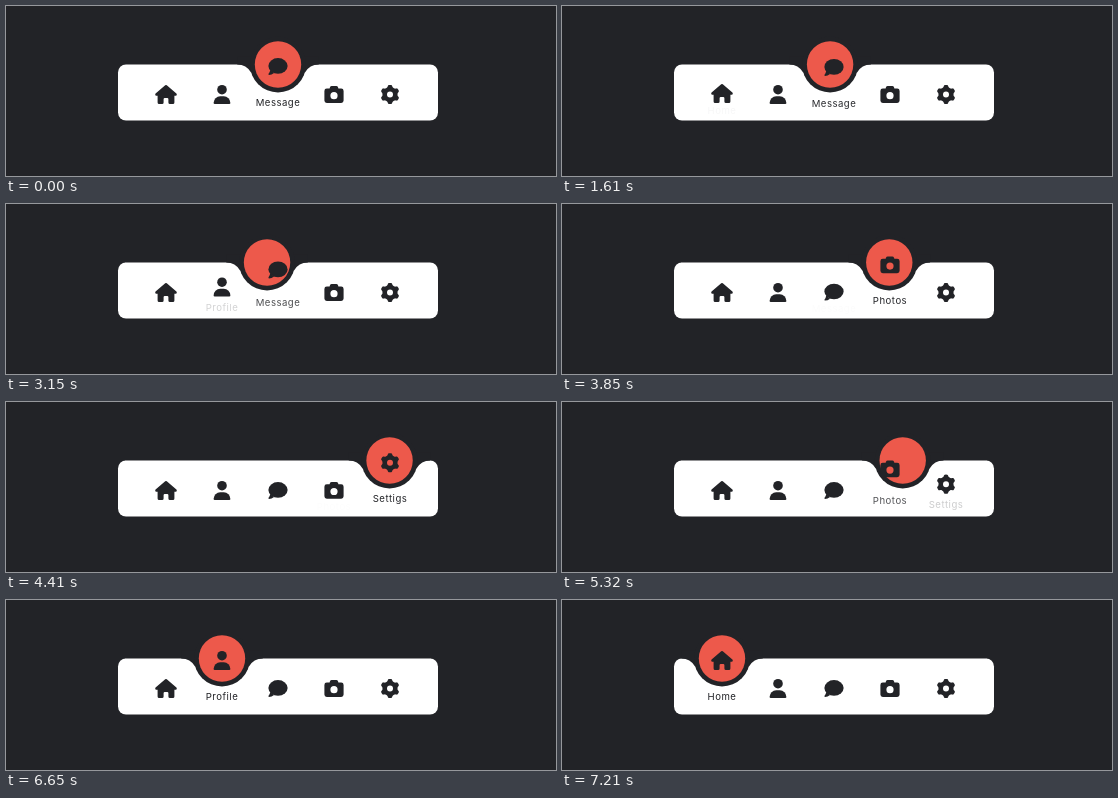
An HTML page that plays this animation: 550x170 px, repeating every 7.35 s.

```html
<!DOCTYPE html>
<html lang="en">
<head>
<meta charset="utf-8">
<title>Navigation bar</title>
<style>
  html, body { margin: 0; width: 100%; height: 100%; overflow: hidden; background: #222327; }
  svg { display: block; width: 550px; height: 170px; fill: #222327; }
  text { font: 12px Inter, sans-serif; letter-spacing: .6px; text-anchor: middle; }
</style>
</head>
<body>
<svg viewBox="0 0 550 170">
  <g transform="translate(112 58.5) scale(.8)">
    <rect width="400" height="70" rx="10" fill="#fff"/>
    <g id="indicator">
      <path id="fillet" d="M-51 0A20 20 0 0 1-33.7 10H-30V-10H-51z"/>
      <use href="#fillet" transform="scale(-1 1)"/>
      <circle r="35"/>
      <circle r="29" fill="#ed594b"/>
    </g>
    <g id="items"></g>
  </g>
</svg>
<script>
const LOOP = 7350, DURATION = 500;
const SPACING = 70, FIRST_X = 60;
const START_ITEM = 2;

// [start time in ms, item that becomes active]
const CLICKS = [
  [1585, 0], [2215, 1], [2900, 2], [3425, 3], [3970, 4],
  [5085, 3], [5575, 2], [6070, 1], [6660, 0]
];

const tooth = 'M-84-160L-54-233q6-17 22-20 32-5 64 0 16 3 22 20L84-160z';
const gear = '<circle r="141" fill="none" stroke="#222327" stroke-width="122"/>' +
  [0, 1, 2, 3, 4, 5].map(i => `<path d="${tooth}" transform="rotate(${i * 60})"/>`).join('');

// Icons are drawn around their centre on a 512-unit em.
const ITEMS = [
  ['Home', `<path d="M0-256q11 0 21 8L277-24q11 11 11 24 0 32-32 32h-32V216q0 40-40 40H104q-40 0-40-40V128
    q0-32-32-32h-64q-32 0-32 32v88q0 40-40 40h-80q-40 0-40-40V32h-32q-32 0-32-32 0-14 10-24L-21-248q10-8 21-8z"/>`],
  ['Profile', `<circle cy="-128" r="128"/>
    <path d="M-46 48h92a178 178 0 0 1 178 178q0 30-30 30h-388q-30 0-30-30A178 178 0 0 1-46 48z"/>`],
  ['Message', `<ellipse cy="-16" rx="256" ry="208"/>
    <path d="M-208 90q-5 54-44 106-12 28 12 28 70 0 136-50z"/>`],
  ['Photos', `<path fill-rule="evenodd" d="M-107-191l-10 31h-75q-64 0-64 64V160q0 64 64 64H192q64 0 64-64V-96
    q0-64-64-64h-75l-10-31q-11-33-46-33H-61q-35 0-46 33zM0-64a96 96 0 0 1 0 192 96 96 0 0 1 0-192z"/>`],
  ['Settigs', gear]
];

const itemX = i => FIRST_X + i * SPACING;
const indicator = document.getElementById('indicator');
const itemsGroup = document.getElementById('items');
itemsGroup.innerHTML = ITEMS.map(([label, icon], i) =>
  `<g transform="translate(${itemX(i)} 0)"><g>${icon}</g><text>${label}</text></g>`).join('');
const parts = [...itemsGroup.children].map(g => ({ icon: g.firstChild, label: g.lastChild }));

// cubic-bezier(.25, .1, .25, 1)
function ease(x) {
  if (x <= 0) return 0;
  if (x >= 1) return 1;
  const bezier = (s, a, b) => 3 * s * (1 - s) ** 2 * a + 3 * s * s * (1 - s) * b + s ** 3;
  let low = 0, high = 1;
  for (let i = 0; i < 24; i++) {
    const mid = (low + high) / 2;
    if (bezier(mid, .25, .25) < x) low = mid; else high = mid;
  }
  return bezier(low, .1, 1);
}

function draw(time) {
  const active = ITEMS.map((_, i) => i === START_ITEM ? 1 : 0);
  let previous = START_ITEM;
  for (const [start, next] of CLICKS) {
    const progress = ease((time - start) / DURATION);
    active[previous] -= progress;
    active[next] += progress;
    previous = next;
  }
  const x = active.reduce((sum, amount, i) => sum + amount * itemX(i), 0);
  indicator.setAttribute('transform', `translate(${x} 0)`);
  parts.forEach(({ icon, label }, i) => {
    icon.setAttribute('transform', `translate(0 ${37.5 - 35 * active[i]}) scale(${24 / 512})`);
    label.setAttribute('y', 62.2 - 10 * active[i]);
    label.setAttribute('opacity', Math.min(1, Math.max(0, active[i])));
  });
}

const origin = performance.now();
function tick() {
  draw((performance.now() - origin) % LOOP);
  requestAnimationFrame(tick);
}
tick();
</script>
</body>
</html>
```
